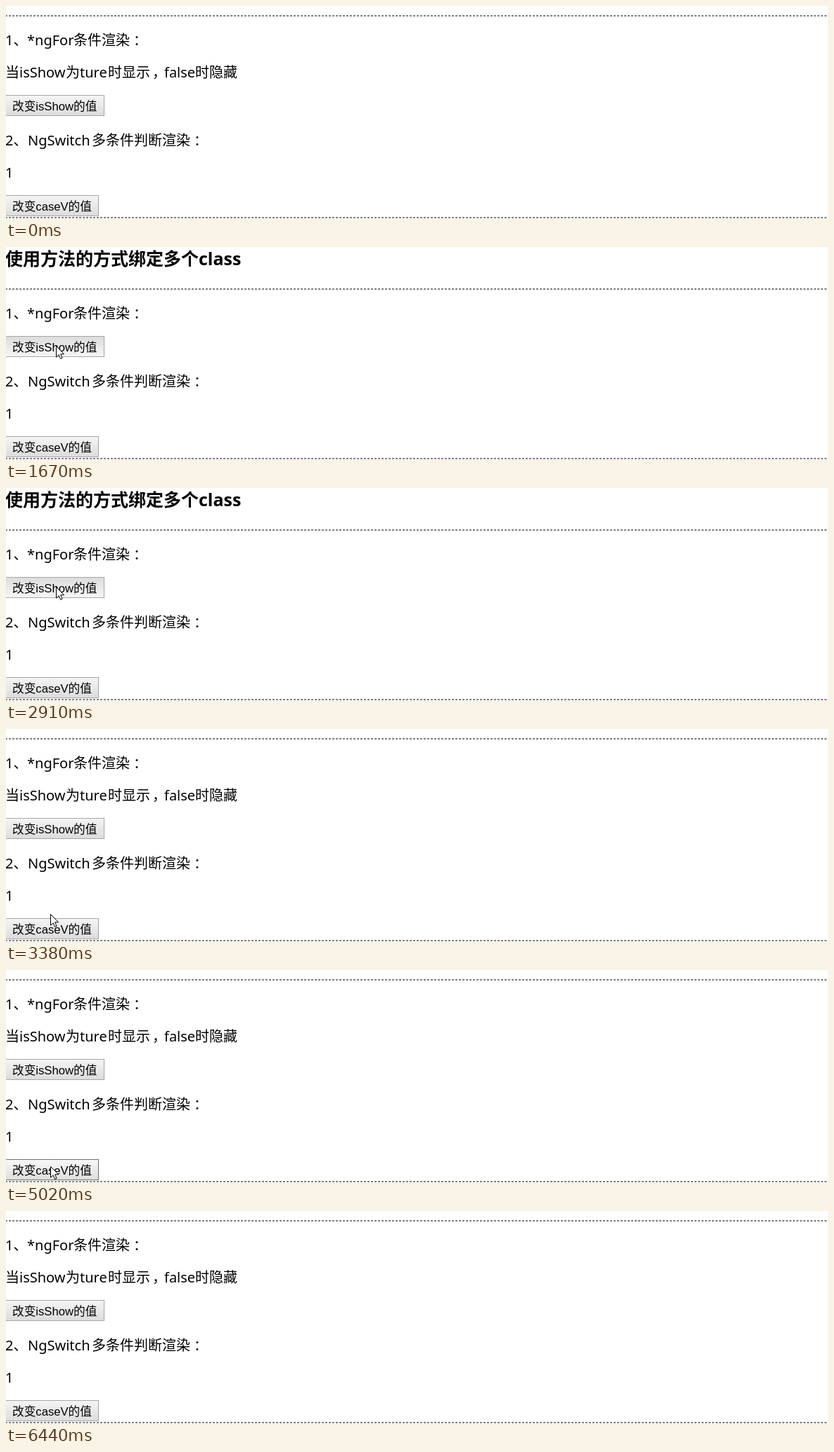
An HTML page that plays this animation: 1169x304 px, repeating every 7.44 s.

```html
<!DOCTYPE html>
<html lang="zh-CN">
<head>
<meta charset="utf-8">
<style>
html, body { margin: 0; width: 100%; height: 100%; overflow: hidden; background: #fff; }
svg { display: block; width: 1169px; height: 304px; }
text { font: 20px "Noto Sans", "Noto Sans CJK SC", sans-serif; white-space: pre; }
.colon { font-family: "Noto Sans CJK JP", sans-serif; }
.title { font-size: 25px; font-weight: 700; font-family: "Open Sans", "Noto Sans CJK SC", sans-serif; }
.label { font: 16.67px "Liberation Sans", "Noto Sans CJK SC", sans-serif; }
.rule { stroke: #808080; stroke-width: 2; stroke-dasharray: 3 2; shape-rendering: crispEdges; }
</style>
</head>
<body>
<svg viewBox="0 0 1169 304">
  <defs>
    <linearGradient id="up" x2="0" y2="1"><stop stop-color="#f5f5f5"/><stop offset="1" stop-color="#dcdcdc"/></linearGradient>
    <linearGradient id="over" x2="0" y2="1"><stop stop-color="#f8f8f8"/><stop offset="1" stop-color="#dedede"/></linearGradient>
    <linearGradient id="down" x2="0" y2="1"><stop stop-color="#dcdcdc"/><stop offset="1" stop-color="#f6f6f6"/></linearGradient>
  </defs>
  <text id="title" class="title" x="-1" y="26">使用方法的方式绑定多个class</text>
  <g id="head">
    <path class="rule" d="M-1 14H1167"/>
    <text x="-1" y="56">1、<tspan x="30">*ngFor</tspan><tspan x="96">条件渲染</tspan><tspan class="colon" x="181">：</tspan></text>
  </g>
  <text id="note" x="-1" y="102">当<tspan x="19">isShow</tspan><tspan x="85">为</tspan><tspan x="105">ture</tspan><tspan x="145">时显示</tspan><tspan x="208">，</tspan><tspan x="225">false</tspan><tspan x="269">时隐藏</tspan></text>
  <g id="show">
    <rect x="-.5" y="127.5" width="140" height="29"/>
    <text class="label" x="9" y="149">改变isShow的值</text>
  </g>
  <text x="-1" y="199">2、<tspan x="31">NgSwitch</tspan><tspan x="122">多条件判断渲染</tspan><tspan class="colon" x="267">：</tspan></text>
  <text id="value" x="-1" y="245">1</text>
  <g id="case">
    <rect x="-.5" y="270.5" width="132" height="29"/>
    <text class="label" x="9" y="292">改变caseV的值</text>
  </g>
  <path class="rule" d="M-1 302H1167"/>
  <path id="cursor" d="M.5 .5V16.2L4.1 12.8L6.6 18.5L9 17.4L6.6 11.8H11.5Z" fill="#fff" stroke="#000"/>
</svg>
<script>
const LOOP = 7440;
const $ = id => document.getElementById(id);

// press and release times
const showClicks = [[890, 1060], [1670, 1810], [2360, 2530], [2910, 3060]];
const caseClicks = [[4160, 4310], [4630, 4780], [4950, 5020], [5190, 5260], [5430, 5580], [5670, 5820]];

// first and last step time, step count, start and end point, progress curve
const moves = [
  { t0: 70, t1: 570, n: 8, from: [876, 234], to: [71, 141], ease: p => 1 - (1 - p) ** 2 },
  { t0: 3230, t1: 3380, n: 3, from: [70, 170], to: [63, 264], ease: p => p },
  { t0: 3610, t1: 4010, n: 6, from: [63, 266], to: [63, 280], ease: p => p },
  { t0: 5820, t1: 6365, n: 8, from: [63, 280], to: [885, 223], ease: p => p * p }
];

const released = (clicks, t) => clicks.filter(c => t >= c[1]).length;
const pressed = (clicks, t) => clicks.some(c => t >= c[0] && t < c[1]);

function pointer(t) {
  if (t < 70 || t >= 6440) return null;
  const m = moves.filter(m => t >= m.t0).pop();
  const step = Math.min(m.n - 1, Math.floor((t - m.t0) / (m.t1 - m.t0) * (m.n - 1) + 1e-6));
  const p = m.ease(step / (m.n - 1));
  return m.from.map((a, i) => Math.round(a + (m.to[i] - a) * p));
}

function paintButton(id, width, top, pos, down) {
  const over = pos && pos[0] < width && pos[1] >= top && pos[1] < top + 30;
  const box = $(id).firstElementChild;
  box.setAttribute("fill", `url(#${down ? "down" : over ? "over" : "up"})`);
  box.setAttribute("stroke", over && !down ? "#707070" : "#a6a6a6");
}

function draw(t) {
  const pos = pointer(t);
  const hidden = released(showClicks, t) % 2 === 1;
  $("title").style.display = hidden ? "" : "none";
  $("note").style.display = hidden ? "none" : "";
  $("head").setAttribute("transform", `translate(0 ${hidden ? 46 : 0})`);
  $("value").textContent = released(caseClicks, t) % 3 + 1;
  paintButton("show", 140, 127, pos, pressed(showClicks, t));
  paintButton("case", 132, 270, pos, pressed(caseClicks, t));
  $("cursor").style.display = pos ? "" : "none";
  if (pos) $("cursor").setAttribute("transform", `translate(${pos})`);
}

const start = performance.now();
function tick() {
  draw((performance.now() - start) % LOOP);
  requestAnimationFrame(tick);
}
tick();
</script>
</body>
</html>
```
